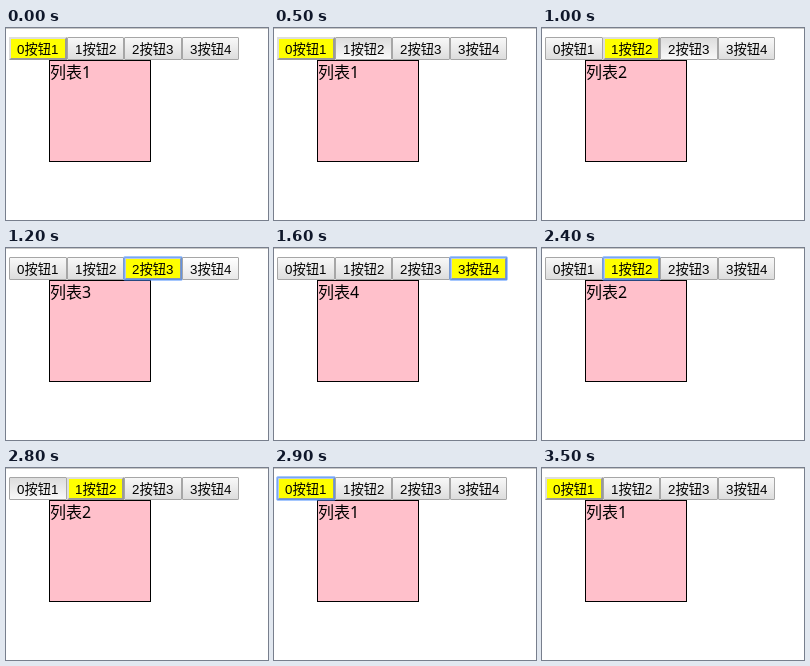
Recreate the animation shown at these times as an HTML page. Size 262 by 192 pixels, loop 3600 ms.

```html
<!DOCTYPE html>
<html lang="zh-CN">
<head>
<meta charset="utf-8">
<title>按钮切换列表</title>
<style>
html, body {
  margin: 0;
  width: 100%;
  height: 100%;
  overflow: hidden;
  background: #fff;
}
body {
  position: relative;
  color: #000;
  font-family: "Liberation Sans", "Noto Sans CJK SC", "Noto Sans CJK", sans-serif;
  font-weight: 300;
  white-space: nowrap;
}
.rule {
  position: absolute;
  top: 0;
  left: 0;
  width: 100%;
  height: 1px;
  background: #c8c8c8;
}
.list {
  position: absolute;
  left: 43px;
  top: 32px;
  width: 100px;
  height: 100px;
  border: 1px solid #000;
  background: pink;
  font: 300 16px/22px "Noto Sans", "Noto Sans CJK SC", "Noto Sans CJK", sans-serif;
}
.btn {
  position: absolute;
  top: 9px;
  height: 23px;
  box-sizing: border-box;
  border: 1px solid #a6a6a6;
  border-radius: 1px;
  background: linear-gradient(#f8f8f8, #ddd);
}
.btn span {
  position: absolute;
  left: 7px;
  top: 1px;
  font-size: 13.333px;
  line-height: 22px;
}
.hover { background: linear-gradient(#fff, #e8e8e8); }
.press { background: linear-gradient(#ddd, #f8f8f8); }
.on {
  border: 2px solid;
  border-color: #ddd #9a9a9a #9a9a9a #ddd;
  border-radius: 0;
  background: #ff0;
}
.on span { left: 6px; top: 0; }
/* focus ring: one pixel outside the button, two inside */
.focus::after {
  content: "";
  position: absolute;
  inset: -3px;
  border: 1px solid rgba(77, 144, 254, .5);
  border-radius: 2px;
  box-shadow: inset 0 0 0 1px rgba(77, 144, 254, .6), inset 0 0 0 2px rgba(77, 144, 254, .25);
}
</style>
</head>
<body>
<div class="rule"></div>
<div class="list" id="list"></div>
<script>
const LOOP = 3600;
const PRESS = 100; // how long the mouse button is held
const BLUR = 3500; // a click on the empty page drops the focus
const LEFT = 3;
const WIDTH = 57.5;

// the pointer's tour of the buttons, times in ms
const VISITS = [
  { button: 1, enter: 200, click: 600 },
  { button: 2, enter: 800, click: 1100 },
  { button: 3, enter: 1200, click: 1600 },
  { button: 2, enter: 1800, click: 2000 },
  { button: 1, enter: 2200, click: 2400 },
  { button: 0, enter: 2600, click: 2900 }
];

const list = document.getElementById("list");
const edge = i => Math.round(LEFT + i * WIDTH);

const buttons = [0, 1, 2, 3].map(i => {
  const btn = document.createElement("div");
  const label = document.createElement("span");
  label.textContent = `${i}按钮${i + 1}`;
  btn.style.left = edge(i) + "px";
  btn.style.width = edge(i + 1) - edge(i) + "px";
  btn.append(label);
  document.body.append(btn);
  return btn;
});

function stateAt(ms) {
  const clicked = VISITS.filter(v => v.click <= ms).pop();
  const visit = VISITS.find(v => v.enter <= ms && ms < v.click);
  const pressing = visit && ms >= visit.click - PRESS;
  return {
    on: clicked ? clicked.button : 0,
    focus: clicked && !pressing && ms < BLUR ? clicked.button : null,
    hover: visit && !pressing ? visit.button : null,
    press: pressing ? visit.button : null
  };
}

function show(state) {
  buttons.forEach((btn, i) => {
    const active = Object.keys(state).filter(name => state[name] === i);
    btn.className = ["btn", ...active].join(" ");
  });
  list.textContent = `列表${state.on + 1}`;
}

const start = performance.now();

function tick() {
  show(stateAt((performance.now() - start) % LOOP));
  requestAnimationFrame(tick);
}

show(stateAt(0));
requestAnimationFrame(tick);
</script>
</body>
</html>
```
